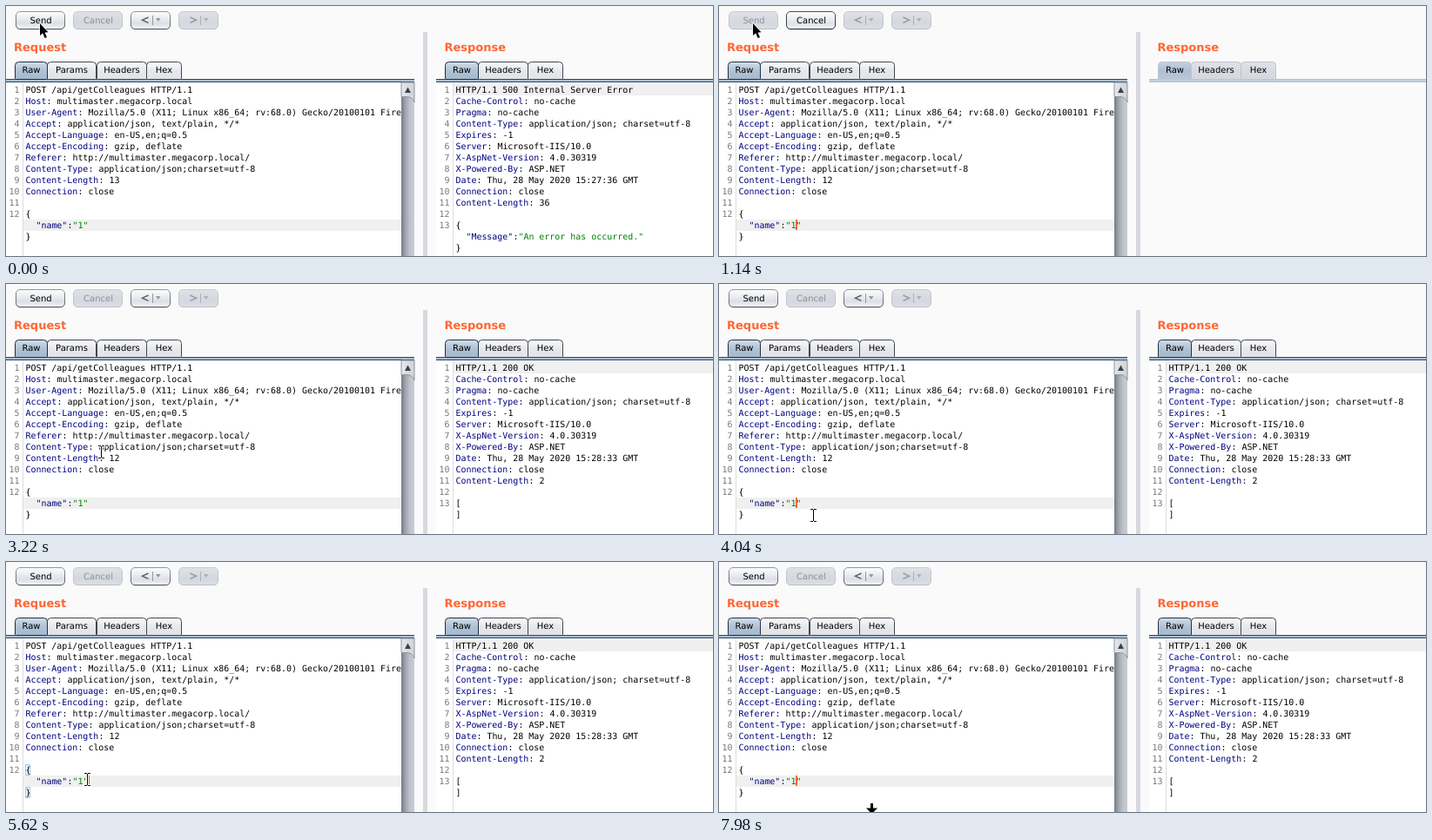
Animation, 812 px wide and 288 px high, one loop 8000 ms. Source, as an HTML page with a canvas:

```html
<!DOCTYPE html>
<html lang="en">
<head>
<meta charset="utf-8">
<title>HTTP repeater</title>
<style>
html, body { margin: 0; width: 100%; height: 100%; overflow: hidden; background: #fafafa; }
canvas { display: block; }
</style>
</head>
<body>
<canvas id="stage" width="812" height="288"></canvas>
<script>
const ctx = document.getElementById('stage').getContext('2d');
const LOOP = 8000, TOP = 90, ROW = 13, CHAR = 6;
const MONO = '9.966px "DejaVu Sans Mono", monospace';
const SANS = '10px "DejaVu Sans", sans-serif';
const BOLD = 'bold 13px "DejaVu Sans", sans-serif';
const NAVY = '#000080', GREEN = '#008000', ORANGE = '#ff6633';

// unhinted glyphs keep the low letter height
ctx.textRendering = 'geometricPrecision';

// time, x, y, shape
const POINTER = [
  [0, 39, 20, arrow], [3060, 58, 52, arrow], [3140, 86, 125, beam],
  [3220, 109, 193, beam], [3340, 113, 222, beam], [3480, 115, 244, beam],
  [3560, 117, 258, beam], [3640, 118, 264, beam], [3780, 118, 266, beam],
  [4040, 108, 266, beam], [4080, 100, 266, beam], [4340, 97, 263, beam],
  [4400, 94, 260, beam], [4480, 93, 258, beam], [4740, 93, 256, beam],
  [4820, 92, 254, beam], [4900, 92, 252, beam], [5600, 93, 250, beam],
  [5660, 102, 252, beam], [5720, 119, 257, beam], [5780, 138, 263, beam],
  [5840, 155, 270, beam], [5900, 167, 276, beam], [5960, 173, 281, beam],
  [6040, 175, 278, resize]
];

// time, caret column (-1 hides it)
const CARET = [[0, -1], [1120, 11], [2960, -1], [4040, 11], [5320, 12], [6840, -1], [7980, 11]];

const at = (steps, t) => steps.filter(s => s[0] <= t).pop();
const between = (t, a, b) => t >= a && t < b;

function rect(x, y, w, h, color) {
  ctx.fillStyle = color;
  ctx.fillRect(x, y, w, h);
}

function text(str, x, y, font, color, align = 'left') {
  ctx.font = font;
  ctx.fillStyle = color;
  ctx.textAlign = align;
  ctx.fillText(str, x, y);
}

function gradient(x0, y0, x1, y1, colors) {
  const g = ctx.createLinearGradient(x0, y0, x1, y1);
  colors.forEach((c, i) => g.addColorStop(i / (colors.length - 1), c));
  return g;
}

function path(points, close) {
  ctx.beginPath();
  points.forEach(([x, y]) => ctx.lineTo(x, y));
  if (close) ctx.closePath();
}

function shape(points, fill, stroke, width) {
  path(points, true);
  ctx.lineJoin = 'round';
  if (stroke) {
    ctx.strokeStyle = stroke;
    ctx.lineWidth = width;
    ctx.stroke();
  }
  ctx.fillStyle = fill;
  ctx.fill();
}

// fill from top to bottom, outline from top to bottom, ink
const BUTTON = {
  normal: [['#fdfdfe', '#eef0f2', '#dcdfe5', '#f3f5f7'], ['#95989e', '#55585e'], '#000'],
  hover: [['#ffffff', '#f7f8fa', '#e7eaee', '#fbfcfd'], ['#95989e', '#55585e'], '#000'],
  pressed: [['#8795a8', '#a0adbd', '#a9b6c6', '#c3cedb'], ['#3f4854', '#5d6875'], '#000'],
  focus: [['#fdfdfe', '#f0f1f3', '#dfe2e7', '#f5f6f8'], ['#4a4d54', '#2c2f34'], '#000'],
  off: [['#dfe2e7', '#d9dce2', '#d4d8df', '#dcdfe5'], ['#c9ccd2', '#bcbfc6'], '#8e8f91']
};

function button(x, w, state) {
  const [fill, edge, ink] = BUTTON[state];
  ctx.lineWidth = 1;
  if (state !== 'off') {
    ctx.beginPath();
    ctx.roundRect(x + .5, 7.5, w - 1, 20, 5);
    ctx.strokeStyle = '#dfe1e5';
    ctx.stroke();
  }
  ctx.beginPath();
  ctx.roundRect(x + .5, 6.5, w - 1, 20, 4.5);
  ctx.fillStyle = gradient(0, 6, 0, 27, fill);
  ctx.fill();
  ctx.strokeStyle = gradient(0, 6, 0, 27, edge);
  ctx.stroke();
  return ink;
}

function labelButton(x, w, label, state) {
  text(label, x + w / 2 + .5, 20, SANS, button(x, w, state), 'center');
}

function arrowButton(x, dir, state) {
  button(x, 46, state);
  const on = state !== 'off', cx = x + 17;
  path([[cx - dir * 3.5, 13], [cx + dir * 3.5, 16.2], [cx - dir * 3.5, 19.4]]);
  ctx.lineJoin = 'miter';
  ctx.strokeStyle = on ? '#5c5e62' : '#96989d';
  ctx.lineWidth = 1.4;
  ctx.stroke();
  const soft = on ? '#96999f' : '#adb0b6';
  rect(x + 25, 11, 1, 11, soft);
  shape([[x + 29, 14], [x + 34.5, 14], [x + 31.75, 18]], soft);
}

function tab(x, w, label, selected, on) {
  const fill = selected
    ? (on ? ['#d3dee9', '#b0c2d4', '#a5b8cc'] : ['#c5d2df', '#adbfd1', '#b8c8d8'])
    : (on ? ['#fbfbfc', '#e6e8ec', '#dfe2e7'] : ['#e0e3e8', '#d8dbe1', '#d5d9df']);
  ctx.beginPath();
  ctx.roundRect(x + .5, 64.5, w, 20, [4, 4, 1, 1]);
  ctx.fillStyle = gradient(0, 64, 0, 85, fill);
  ctx.fill();
  ctx.strokeStyle = on ? (selected ? '#1f3147' : '#42474f') : '#c0c6cf';
  ctx.lineWidth = 1;
  ctx.stroke();
  text(label, x + w / 2 + .5, 77, SANS, '#000', 'center');
}

function tabStrip(x, w, on) {
  const edge = on ? '#2b4a69' : '#b3c2d1';
  rect(x, 84, w, 4, on ? '#a9bccf' : '#c3d0dd');
  rect(x, 84, w, 1, edge);
  rect(x, 87, w, 1, edge);
}

function line(str, x, row) {
  const y = TOP + row * ROW + 10;
  const put = (s, col, color) => text(s, x + col * CHAR + .4, y, MONO, color);
  const json = str.match(/^(\s*)(".*?"):(".*")$/);
  const head = row && str.match(/^([\w-]+)(:.*)$/);
  if (json) {
    const k = json[1].length, v = k + json[2].length;
    put(json[2], k, NAVY);
    put(':', v, '#000');
    put(json[3], v + 1, GREEN);
  } else if (head) {
    put(head[1], 0, NAVY);
    put(head[2], head[1].length, '#000');
  } else {
    put(str, 0, '#000');
  }
}

function editor(x, w, lines, count, current) {
  rect(x, 88, w, 200, '#fff');
  rect(x + 19, 88, 1, 200, '#dcdcdc');
  rect(x + 20, TOP + current * ROW, w - 20, ROW, '#f0f0f0');
  for (let i = 0; i < count; i++) {
    text(i + 1, x + 15.5, TOP + i * ROW + 10, MONO, '#787878', 'right');
  }
  lines.forEach((s, i) => line(s, x + 22, i));
}

function requestLines(length) {
  return ['POST /api/getColleagues HTTP/1.1',
    'Host: multimaster.megacorp.local',
    'User-Agent: Mozilla/5.0 (X11; Linux x86_64; rv:68.0) Gecko/20100101 Fire',
    'Accept: application/json, text/plain, */*',
    'Accept-Language: en-US,en;q=0.5',
    'Accept-Encoding: gzip, deflate',
    'Referer: http://multimaster.megacorp.local/',
    'Content-Type: application/json;charset=utf-8',
    'Content-Length: ' + length,
    'Connection: close', '', '{', '  "name":"1"', '}'];
}

function responseLines(status, time, length, body) {
  return ['HTTP/1.1 ' + status,
    'Cache-Control: no-cache',
    'Pragma: no-cache',
    'Content-Type: application/json; charset=utf-8',
    'Expires: -1',
    'Server: Microsoft-IIS/10.0',
    'X-AspNet-Version: 4.0.30319',
    'X-Powered-By: ASP.NET',
    `Date: Thu, 28 May 2020 ${time} GMT`,
    'Connection: close',
    'Content-Length: ' + length, '', ...body];
}

const FAILED = responseLines('500 Internal Server Error', '15:27:36', 36,
  ['{', '  "Message":"An error has occurred."', '}']);
const PASSED = responseLines('200 OK', '15:28:33', 2, ['[', ']']);

function scrollbar() {
  rect(454, 88, 15, 200, gradient(454, 0, 469, 0, ['#757b85', '#a1a6af', '#bfc3cb', '#c9ccd3']));
  ctx.beginPath();
  ctx.moveTo(454, 88);
  ctx.lineTo(469, 88);
  ctx.lineTo(469, 111);
  ctx.quadraticCurveTo(467, 104.5, 460, 104.5);
  ctx.lineTo(454, 104.5);
  ctx.closePath();
  ctx.fillStyle = gradient(454, 0, 469, 0, ['#e6e8ec', '#d9dce1', '#cfd3da']);
  ctx.fill();
  ctx.strokeStyle = '#8f949d';
  ctx.lineWidth = 1;
  ctx.stroke();
  shape([[458, 100], [465, 100], [461.5, 93.5]], '#3d4046');
}

function bracket(row) {
  const y = TOP + row * ROW;
  rect(22, y, 6, ROW, '#eaf4fc');
  ctx.strokeStyle = '#9ccbe8';
  ctx.lineWidth = 1;
  ctx.strokeRect(22.5, y + .5, 5, ROW - 1);
}

function arrow(x, y) {
  shape([[x, y], [x, y + 14], [x + 3.2, y + 11.2], [x + 5.6, y + 17],
    [x + 8, y + 16], [x + 5.5, y + 10.4], [x + 9.5, y + 10.2]], '#000', '#fff', 1.6);
}

function beam(x, y) {
  const parts = [[x, y - 6, 1, 13], [x - 3, y - 7, 3, 1], [x + 1, y - 7, 3, 1],
    [x - 3, y + 7, 3, 1], [x + 1, y + 7, 3, 1]];
  parts.forEach(([a, b, w, h]) => rect(a - 1, b - 1, w + 2, h + 2, '#fff'));
  parts.forEach(([a, b, w, h]) => rect(a, b, w, h, '#000'));
}

function resize(x, y) {
  shape([[x - 1, y], [x + 2, y], [x + 2, y + 5.5], [x + 7, y + 5.5],
    [x + .5, y + 12], [x - 6, y + 5.5], [x - 1, y + 5.5]], '#000', '#fff', 1.5);
}

function draw(t) {
  const busy = between(t, 1100, 1980);
  const empty = between(t, 1140, 1980);
  rect(0, 0, 812, 288, '#fafafa');

  const send = busy ? 'off' : between(t, 860, 1100) ? 'pressed'
    : between(t, 120, 860) ? 'hover' : 'normal';
  labelButton(11, 57, 'Send', send);
  labelButton(77, 57, 'Cancel', busy ? 'focus' : 'off');
  arrowButton(143, -1, busy ? 'off' : 'normal');
  arrowButton(198, 1, 'off');

  text('Request', 9, 52, BOLD, ORANGE);
  text('Response', 503.4, 52, BOLD, ORANGE);
  rect(479, 30, 5, 258, '#d6d9df');

  tabStrip(0, 469, true);
  tab(47, 56, 'Params', false, true);
  tab(104, 57, 'Headers', false, true);
  tab(161, 40, 'Hex', false, true);
  tab(10, 37, 'Raw', true, true);
  tabStrip(494, 318, !empty);
  tab(542, 57, 'Headers', false, !empty);
  tab(599, 40, 'Hex', false, !empty);
  tab(504, 38, 'Raw', true, !empty);

  editor(0, 454, [], 12, 12);
  if (between(t, 5440, 7980)) [11, 13].forEach(bracket);
  requestLines(t < 1120 ? 13 : 12).forEach((s, i) => line(s, 22, i));
  const col = at(CARET, t)[1];
  if (col >= 0) rect(22 + col * CHAR, TOP + 12 * ROW, 2, 12, ORANGE);
  scrollbar();

  if (!empty) editor(494, 318, t < 1140 ? FAILED : PASSED, 13, 0);

  const [, x, y, cursor] = at(POINTER, t);
  cursor(x, y);
}

const start = performance.now();
function frame() {
  draw((performance.now() - start) % LOOP);
  requestAnimationFrame(frame);
}
frame();
</script>
</body>
</html>
```
